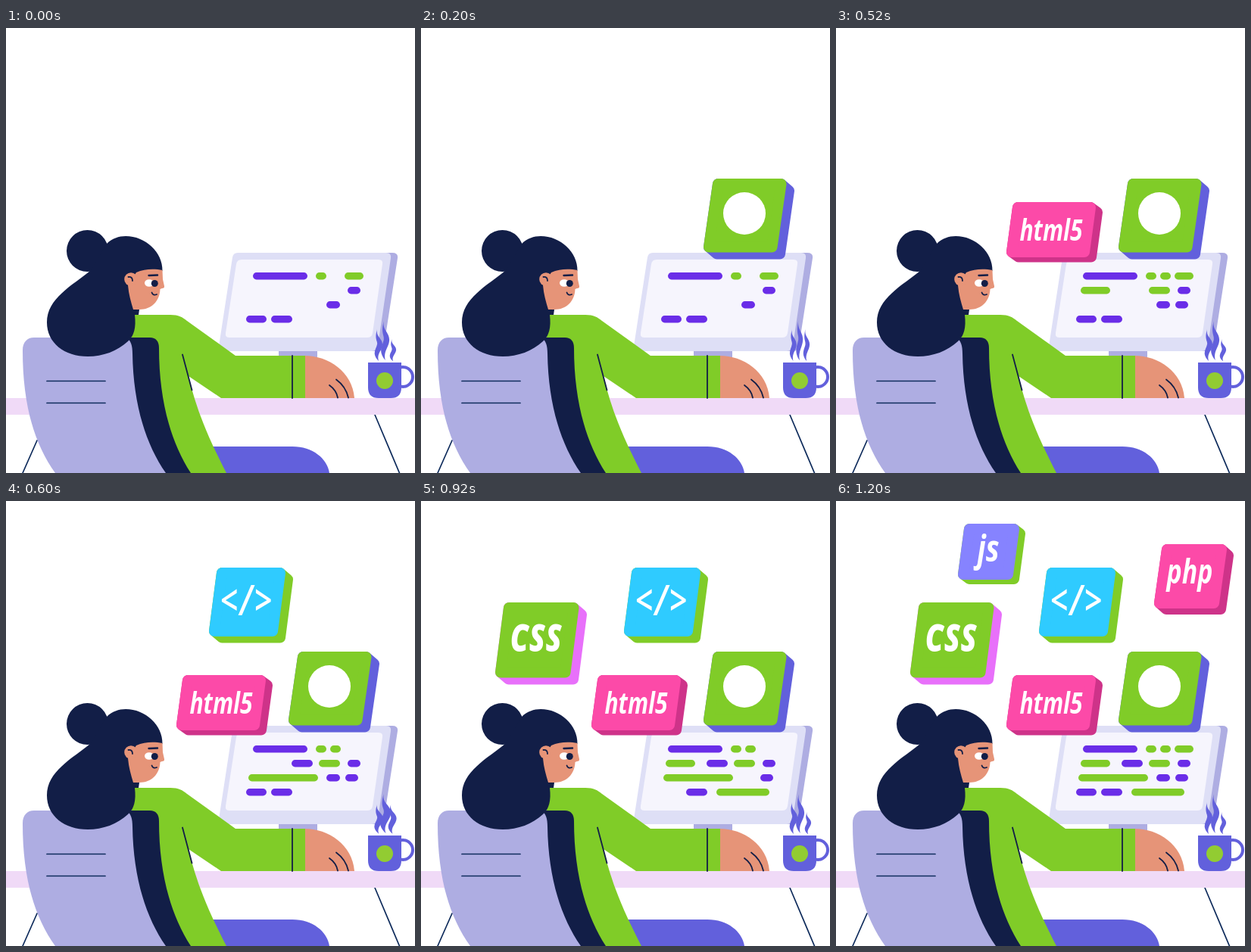
These frames come from a looping animation (540 by 588 pixels, 1.4 s). An HTML page:

```html
<!DOCTYPE html>
<html lang="en">
<head>
<meta charset="utf-8">
<title>Coding at the desk</title>
<style>
  html, body { margin: 0; width: 100%; height: 100%; overflow: hidden; background: #fff; }
  svg { display: block; width: 100%; height: 100%; }
  .lilac { fill: #aeade2; }
  .indigo { fill: #6260dc; }
  .green { fill: #80cc28; }
  .navy { fill: #121e47; }
  .skin { fill: #e69478; }
  .line { fill: none; stroke: #0f2c5c; stroke-width: 1.7; stroke-linecap: round; }
  .ink { fill: none; stroke: #121e47; stroke-width: 1.8; stroke-linecap: round; }
  text { font: italic 700 40px "Open Sans", "Noto Sans", sans-serif; fill: #fff; text-anchor: middle; }
</style>
</head>
<body>
<svg viewBox="0 0 540 588">
  <!-- monitor -->
  <path class="lilac" d="M500 297H510Q518 297 517 304L499 420Q498 427 491 427H470Z"/>
  <rect class="lilac" x="360" y="426" width="51" height="14"/>
  <path fill="#dedff6" d="M306 297H502Q509 297 508 304L491 420Q490 427 483 427H280L299 303Q300 297 306 297Z"/>
  <path fill="#f6f5fd" d="M311 306H492Q498 306 497 312L484 403Q483 409 477 409H295Q289 409 290 403L304 312Q305 306 311 306Z"/>
  <g id="bars"></g>
  <g id="tiles"></g>

  <!-- desk -->
  <path class="line" d="M487 511L519.500 588M41 545L22 588"/>
  <rect y="489" width="540" height="22" fill="#f0daf7"/>

  <!-- mug -->
  <g id="steam" class="indigo"></g>
  <circle cx="524" cy="461" r="13" fill="none" stroke="#6260dc" stroke-width="4"/>
  <path class="indigo" d="M478 442H522V475Q522 489 508 489H492Q478 489 478 475Z"/>
  <circle cx="500" cy="466" r="11" fill="#92cc32"/>

  <!-- body and arm -->
  <path class="indigo" d="M262 553H378C405 553 424 569 427 588H270Z"/>
  <path class="skin" d="M394 433C426 433 457 454 460 489H394Z"/>
  <path class="green" d="M168 379H217C228 379 233 382 239 387L303 433H395V489H284L241 460C250 500 266 540 291 588H230L165 420Z"/>
  <path class="ink" d="M233 431.500L245.500 478.500M378 433V489"/>
  <path class="ink" d="M436 464.500C445 471 450 480 452 488.500M427 472C434 477 437 483 438 488.500"/>

  <!-- chair -->
  <path class="navy" d="M150 409H190C198 409 202 414 202 423C202 490 217 547 244 588H190Z"/>
  <path class="lilac" d="M37 409H159C165 413 167 420 167 430C168 498 185 551 211 588H65C37 549 22 497 22 426C22 415 28 409 37 409Z"/>
  <path class="line" d="M54 466.500H131M54 495.500H131"/>

  <!-- head -->
  <circle class="navy" cx="107.500" cy="294.500" r="27.500"/>
  <path class="navy" d="M133 285C140 278 149 275 158 275C184 275 207 296 206.500 321L172 340V372H176L175 379H170C172 396 169 407 161 414C147 427 128 434 108 434C77 434 54 416 54 389C54 357 87 341 112 320Z"/>
  <path class="skin" d="M172 323C183 318 196 318 206.500 320L207 332L209 341Q209.500 344 206 344L203.500 345C203 361 192 372 176 372H168C165 362 162 352 161 340Z"/>
  <circle class="skin" cx="165" cy="332" r="8.800"/>
  <path class="ink" d="M161.500 329C165.500 328.500 167 330.500 167 334"/>
  <ellipse cx="189" cy="337" rx="6" ry="4.800" fill="#fff"/>
  <circle class="navy" cx="196.300" cy="337.500" r="4.500"/>
  <path class="ink" style="stroke-width:2.400" d="M188.500 327L200 326.500"/>
  <path class="ink" d="M192.500 349.500Q194 354 199 352"/>
</svg>
<script>
const STEPS = 7, LOOP = 1400;
const NS = "http://www.w3.org/2000/svg";
const GREEN = "#80cc28", PURPLE = "#6a2de8", PINK = "#fc4aa8", ROSE = "#ce3389";

function add(parent, tag, attrs, label) {
  const el = document.createElementNS(NS, tag);
  for (const k in attrs) el.setAttribute(k, attrs[k]);
  if (label) el.textContent = label;
  parent.append(el);
  return el;
}

// One digit per step: 1 shows the element, 0 hides it.
function blink(el, mask) {
  const keys = [...mask, mask[0]].map((c, i) => ({ opacity: +c, offset: i / STEPS, easing: "step-end" }));
  el.animate(keys, { duration: LOOP, iterations: Infinity }).startTime = 0;
}

const from = n => "0".repeat(n) + "1".repeat(STEPS - n);

// Code lines: left, right, colour, mask
const rows = [
  [[326, 398, PURPLE, "1111111"], [409, 423, GREEN, "1111101"], [428, 442, GREEN, "0011111"], [447, 472, GREEN, "1110011"]],
  [[323, 362, GREEN, "0010101"], [377, 405, PURPLE, "0001111"], [413, 441, GREEN, "0011111"], [451, 468, PURPLE, "1111111"]],
  [[320, 412, GREEN, "0001111"], [423, 441, PURPLE, "1111011"], [448, 465, PURPLE, "0011111"]],
  [[317, 344, PURPLE, "1111011"], [350, 378, PURPLE, "1111111"], [390, 460, GREEN, "0000101"]]
];
const bars = document.getElementById("bars");
rows.forEach((row, i) => {
  for (const [x, end, fill, mask] of row) {
    const y = 323 + i * 19;
    blink(add(bars, "rect", { x, y, width: end - x, height: 9.4, rx: 4.7, fill }), mask);
  }
});

// Slanted block with rounded corners and a visible side
function tile({ x, y, w, h, slant, dx, dy, face, side, at }) {
  const r = 7, g = add(document.getElementById("tiles"), "g", {});
  const tl = [x + r, y + r], tr = [x + w - r, y + r];
  const br = [x + w - slant - r, y + h - r], bl = [x - slant + r, y + h - r];
  const back = ([a, b]) => [a + dx, b + dy];
  const shape = (points, color) => add(g, "polygon", {
    points: points.join(" "), fill: color, stroke: color, "stroke-width": 2 * r, "stroke-linejoin": "round"
  });
  shape([tl, tr, back(tr), back(br), back(bl), bl], side);
  shape([tl, tr, br, bl], face);
  blink(g, from(at));
  return g;
}

// All labels share one condensed lettering style.
function label(g, str, x, y, size, style = "") {
  add(g, "text", { transform: `translate(${x} ${y}) scale(.77 1)`, style: `font-size:${size}px;${style}` }, str);
}

const badge = tile({ x: 385, y: 199, w: 97.5, h: 97.5, slant: 12, dx: 10.5, dy: 9, face: GREEN, side: "#6260dc", at: 1 });
add(badge, "circle", { cx: 427, cy: 245, r: 28, fill: "#fff" });
label(tile({ x: 233, y: 230, w: 110, h: 73, slant: 8, dx: 9, dy: 6.5, face: PINK, side: ROSE, at: 2 }), "html5", 284, 281, 39);
label(tile({ x: 278, y: 88, w: 91, h: 91, slant: 10, dx: 10, dy: 8.5, face: "#2fcbff", side: GREEN, at: 3 }),
  "</>", 318, 151, 56, "font-weight:600;letter-spacing:3px");
label(tile({ x: 109, y: 134, w: 99.5, h: 99.5, slant: 11, dx: 10.5, dy: 9, face: GREEN, side: "#e870fa", at: 4 }),
  "CSS", 152, 199, 50, "font-weight:800;letter-spacing:1px");
label(tile({ x: 430, y: 57, w: 86, h: 85, slant: 10, dx: 9, dy: 8, face: PINK, side: ROSE, at: 5 }), "php", 467, 109, 44);
label(tile({ x: 169, y: 30, w: 73, h: 74, slant: 8, dx: 8, dy: 6, face: "#8683ff", side: GREEN, at: 6 }), "js", 201, 80, 49);

// Steam poses: mask, then wisps as left, top, width scale, height scale
const WISP = "M5 0C1 14 6 15 5 20C4 26-3 32 7 42C4 32 12 28 12 20C12 12 3 10 5 0Z";
const poses = [
  ["1010101", [[485, 398, 1, 1], [493.5, 387, 1.05, 1.24], [505.5, 411, .8, .7]]],
  ["0100000", [[485.5, 398, .85, 1], [494, 386, .85, 1.27], [503.5, 398, .8, 1]]],
  ["0001010", [[484.5, 401, 1.1, .92], [492, 387, 1.35, 1.24], [503, 401, 1.05, .92]]]
];
const steam = document.getElementById("steam");
for (const [mask, wisps] of poses) {
  const g = add(steam, "g", {});
  for (const [x, y, sx, sy] of wisps) {
    add(g, "path", { d: WISP, transform: `translate(${x} ${y}) scale(${sx} ${sy})` });
  }
  blink(g, mask);
}
</script>
</body>
</html>
```
